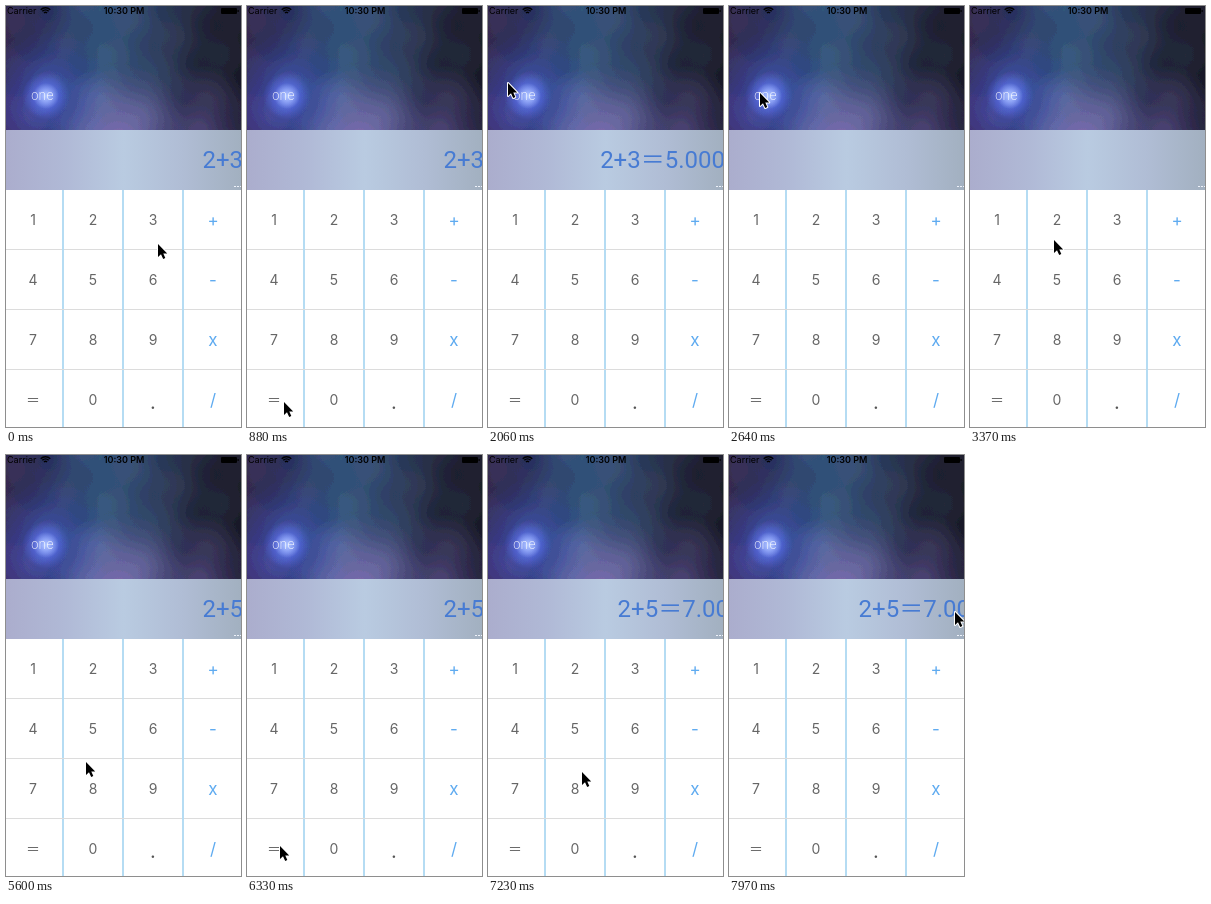
An HTML page with a canvas that plays this animation: 235 px wide and 421 px high, repeating every 8 s.

```html
<!DOCTYPE html>
<html>
<head>
<meta charset="utf-8">
<style>
html, body { margin: 0; width: 235px; height: 421px; overflow: hidden; background: #fff }
canvas { display: block }
</style>
</head>
<body>
<canvas id="stage" width="235" height="421"></canvas>
<script>
const W = 235, H = 421, TOP = 124, CELL = 60, LOOP = 8000, STEP = 147.2;
const SANS = 'Inter, "Noto Sans CJK SC", "Noto Sans CJK JP", sans-serif';
const DIGITS = 'Roboto, "Noto Sans CJK SC", "Noto Sans CJK JP", sans-serif';

// where the pointer stops or turns: step, x, y
const STOPS = [
  [0, 152, 238], [6, 37, 396], [8, 52, 307], [10, 107, 271], [11, 107, 271],
  [14, 20, 77], [19, 32, 88], [22, 92, 258], [23, 84, 234], [25, 87, 215],
  [28, 87, 215], [32, 221, 219], [34, 92, 286], [36, 92, 286], [43, 33, 391],
  [46, 33, 391], [54, 226, 157]
];
// readout: step, text, right edge
const READOUT = [
  [0, '2+3'], [8, '2+3\uff1d5.000'], [17, ''], [28, '2'], [33, '2+'], [36, '2+5'],
  [46, '2+5\uff1d7.00', 241]
];

const ctx = stage.getContext('2d');
const arrow = new Path2D('M0 0V13L3 10.3L5.2 15L7.3 14.1L5.3 9.5H9.2Z');

function text(c, str, x, y, font, color, align = 'left') {
  c.font = font;
  c.fillStyle = color;
  c.textAlign = align;
  c.fillText(str, x, y);
}

function rect(c, x, y, w, h, color) {
  c.fillStyle = color;
  c.fillRect(x, y, w, h);
}

// evenly spaced colours from left to right
function blend(c, y, h, colors) {
  const g = c.createLinearGradient(0, 0, W, 0);
  colors.forEach((color, i) => g.addColorStop(i / (colors.length - 1), color));
  rect(c, 0, y, W, h, g);
}

function glow(c, x, y, r, rgb, alpha) {
  const g = c.createRadialGradient(x, y, 0, x, y, r);
  g.addColorStop(0, `rgba(${rgb},${alpha})`);
  g.addColorStop(.5, `rgba(${rgb},${alpha * .5})`);
  g.addColorStop(1, `rgba(${rgb},0)`);
  rect(c, 0, 0, W, TOP, g);
}

// flat tones with wavy edges
function posterize(c, size) {
  const img = c.getImageData(0, 0, W, TOP), d = img.data;
  for (let i = 0; i < d.length; i++) {
    if (i % 4 == 3) continue;
    const x = (i >> 2) % W, y = (i >> 2) / W;
    const wave = 3 * Math.sin(x / 9 + y / 23) + 2 * Math.sin(y / 7 - x / 19);
    d[i] = Math.round((d[i] + wave) / size) * size;
  }
  c.putImageData(img, 0, 0);
}

function wallpaper(c) {
  blend(c, 0, TOP, ['#33294f', '#2e3865', '#34557c', '#32466a', '#252a40', '#1b1c2a']);
  glow(c, 0, 118, 55, '82,58,135', .6);
  glow(c, 112, 128, 70, '145,122,195', .8);
  glow(c, 195, 124, 65, '92,76,142', .6);
  glow(c, 40, 90, 65, '72,96,220', .6);
  posterize(c, 8);
  glow(c, 40, 90, 24, '100,125,255', 1);
  glow(c, 40, 90, 13, '190,210,255', .9);
  text(c, 'one', 25, 94, '200 13px ' + SANS, '#fff');
}

function statusBar(c) {
  text(c, 'Carrier', 1, 8, '9px ' + SANS, '#000');
  text(c, '10:30 PM', 118, 8, '600 9px ' + SANS, '#000', 'center');
  c.strokeStyle = '#000';
  c.lineWidth = 1.4;
  for (const r of [2.2, 4.5, 6.8]) {
    c.beginPath();
    c.arc(39.5, 8.5, r, -2.35, -.79);
    c.stroke();
  }
  c.fillStyle = '#000';
  c.beginPath();
  c.roundRect(215, 2, 16, 6, 1);
  c.rect(231.5, 4, 1.2, 2);
  c.fill();
}

function keypad(c) {
  blend(c, TOP, CELL, ['#abadcd', '#b0b9d6', '#b9cbe1', '#b0bdd5', '#a2b0c0']);
  rect(c, 0, 184, W, H - 184, '#fff');
  for (let i = 0; i < 3; i++) {
    rect(c, 0, 243 + CELL * i, W, 1, '#dcdcdc');
    rect(c, 56 + CELL * i, 184, 2, H - 184, '#b5dcf3');
  }
  ['123+', '456-', '789x', '\uff1d0./'].forEach((row, j) => [...row].forEach((key, i) => {
    const x = 27 + CELL * i, y = 219 + CELL * j;
    if (key == '.') text(c, key, x, y + 4, '20px ' + SANS, '#555', 'center');
    else if (i == 3) text(c, key, x, y + 1, '17px ' + SANS, '#5fabf0', 'center');
    else text(c, key, x, y, '14px ' + SANS, '#666', 'center');
  }));
  for (let x = 228; x < W; x += 3) rect(c, x, 180, 2, 1, '#eef2fa');
}

const scene = document.createElement('canvas');
scene.width = W;
scene.height = H;
const base = scene.getContext('2d');
wallpaper(base);
statusBar(base);
keypad(base);

function pointer(n) {
  const k = Math.max(1, STOPS.findIndex(s => s[0] >= n));
  const [n0, x0, y0] = STOPS[k - 1], [n1, x1, y1] = STOPS[k];
  const f = (n - n0) / (n1 - n0), ease = f * f * (3 - 2 * f);
  return [x0 + (x1 - x0) * ease, y0 + (y1 - y0) * ease];
}

function draw(time) {
  // the screen refreshes in coarse steps
  const n = Math.floor((time % LOOP + 21) / STEP);
  ctx.drawImage(scene, 0, 0);
  const [, str, right = 237] = READOUT.findLast(r => r[0] <= n);
  text(ctx, str, right, 162, '24px ' + DIGITS, '#477bd3', 'right');
  ctx.save();
  ctx.translate(...pointer(n).map(Math.round));
  ctx.lineWidth = 2;
  ctx.lineJoin = 'round';
  ctx.strokeStyle = '#fff';
  ctx.stroke(arrow);
  ctx.fillStyle = '#000';
  ctx.fill(arrow);
  ctx.restore();
}

let start;
function tick(now) {
  start ??= now;
  draw(now - start);
  requestAnimationFrame(tick);
}
requestAnimationFrame(tick);
</script>
</body>
</html>
```
